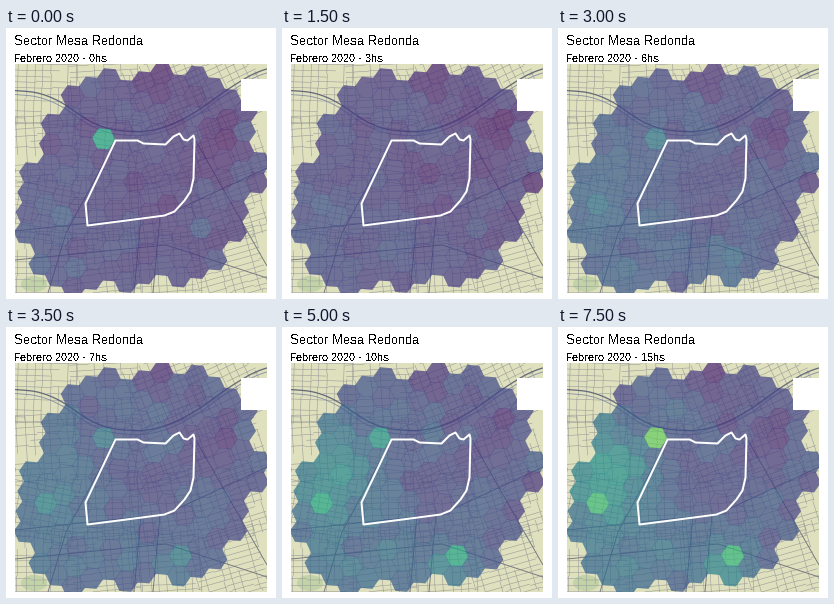
Recreate the animation shown at these times as a matplotlib script. Size 270 by 271 pixels, loop 8 s.

```python
import numpy as np
import matplotlib.pyplot as plt
from matplotlib.animation import FuncAnimation
from matplotlib.collections import LineCollection, PolyCollection
from matplotlib.patches import Ellipse, Rectangle

W, H, DPI = 270, 271, 100
PX = 72 / DPI
HOURS = 16
X0, Y0, X1, Y1 = 9, 36, 261, 265

plt.rcParams.update({"text.hinting": "native", "text.hinting_factor": 1})
fig = plt.figure(figsize=(W / DPI, H / DPI), dpi=DPI, facecolor="white")
ax = fig.add_axes([0, 0, 1, 1])
ax.set_xlim(0, W)
ax.set_ylim(H, 0)
ax.axis("off")

panel = Rectangle((X0, Y0), X1 - X0, Y1 - Y0, fc="#dfe0bd", ec="none", zorder=0)
ax.add_patch(panel)
park = Ellipse((28, 256), 26, 16, fc="#c3d3a8", ec="none", zorder=0.5)
ax.add_patch(park)
park.set_clip_path(panel)
rng = np.random.default_rng(12)


def add(collection):
    ax.add_collection(collection)
    collection.set_clip_path(panel)
    return collection


def directions(deg):
    a = np.radians(deg)
    return np.stack([np.cos(a), np.sin(a)], -1)


# --- base map: blocks of broken, tilted streets ---
def street_grid(center, size, angle, gap):
    u, v = directions(np.array([angle, angle + 90]))
    segs = []
    for along, across, step in ((u, v, gap), (v, u, gap * 1.4)):
        for off in np.arange(-size / 2, size / 2, step):
            s = -size / 2
            while s < size / 2:
                e = s + rng.uniform(14, 45)
                if rng.random() < 0.8:
                    base = center + across * (off + rng.uniform(-1, 1))
                    segs.append([base + along * s, base + along * min(e, size / 2)])
                s = e
    return segs


streets = []
for cx in range(X0 + 28, X1, 62):
    for cy in range(Y0 + 28, Y1, 58):
        tilt = -8 - 0.16 * (cx - 135) + rng.uniform(-12, 12)
        streets += street_grid(np.array([cx, cy]), 68, tilt, 6)
add(LineCollection(streets, colors="#999b98", linewidths=0.55 * PX, zorder=1))

avenues = [[(9, 203), (160, 187), (261, 140)], [(187, 108), (261, 238)],
           [(110, 112), (60, 205), (42, 265)], [(9, 232), (160, 217), (261, 250)]]
avenues += [[(x, 188), (x - 7, Y1)] for x in (135, 154)]
add(LineCollection(avenues, colors="#72757c", linewidths=0.9 * PX, zorder=1))

# river bend with its two banks
rx = np.linspace(X0, X1, 80)
ry = np.interp(rx, [9, 44, 94, 144, 184, 224, 261], [62, 66, 101, 105, 89, 59, 38])
ry = np.convolve(np.pad(ry, 6, mode="edge"), np.ones(13) / 13, "valid")
add(LineCollection([np.c_[rx, ry + d] for d in (0, 4)], colors=["#666b7a", "#8b93a3"],
                   linewidths=[1.3 * PX, 0.9 * PX], zorder=1))

# --- sector outline ---
SECTOR = np.array([(109, 112), (131, 112), (137, 115), (159, 116), (167, 108),
                   (173, 105), (177, 111), (181, 112), (187, 107), (188, 111),
                   (187, 150), (184, 163), (178, 172), (168, 183), (158, 187),
                   (120, 192), (81, 197), (79, 175)]) + 0.5
outline = plt.Polygon(SECTOR, fill=False, ec="white", lw=2 * PX,
                      joinstyle="round", zorder=3)
ax.add_patch(outline)

# --- tilted hexagon lattice, kept within REACH of the sector ---
STEP, TILT, REACH = 20.1, 5, 65
basis = STEP * directions(np.array([30 + TILT, 90 + TILT]))
grid = np.stack(np.meshgrid(np.arange(-8, 14), np.arange(-14, 16)), -1).reshape(-1, 2)
centers = np.array([97.7, 111]) + grid @ basis

a, b = SECTOR, np.roll(SECTOR, -1, axis=0)
along = ((centers[:, None] - a) * (b - a)).sum(2) / ((b - a) ** 2).sum(1)
nearest = a + np.clip(along, 0, 1)[..., None] * (b - a)
gap = np.linalg.norm(centers[:, None] - nearest, axis=2).min(1)
centers = centers[(gap < REACH) | outline.get_path().contains_points(centers)]

corners = 1.02 * STEP / np.sqrt(3) * directions(TILT + 60 * np.arange(6))
hexes = add(PolyCollection(centers[:, None] + corners, linewidths=0, zorder=2))
cmap = plt.get_cmap("viridis")


# --- activity per cell and hour ---
def blob(x, y, sx, sy):
    return np.exp(-(((centers - (x, y)) / (sx, sy)) ** 2).sum(1) / 2)


def ease(t, start, end):
    u = np.clip((t - start) / (end - start), 0, 1)
    return u * u * (3 - 2 * u)


def spot(x, y):
    return blob(x, y, 5, 5)


west = blob(48, 145, 32, 34)
south = blob(169, 238, 17, 17) + 0.45 * blob(85, 235, 55, 30)
cold = blob(212, 105, 22, 28) + blob(152, 52, 18, 14) + 0.5 * blob(140, 150, 26, 20)
corner, market, depot = spot(97, 111), spot(39, 177), spot(174, 229)
fixed = rng.normal(0, 1, len(centers))
wobble = rng.normal(0, 1, (HOURS, len(centers)))


def levels(hour):
    day = ease(hour, 3, 13)
    v = 0.17 + 0.05 * ease(hour, 3, 7) + 0.03 * blob(50, 200, 60, 70)
    v = v + 0.018 * fixed + 0.015 * wobble[hour] - 0.08 * cold
    v += day * (0.28 * west + 0.2 * south)
    v += corner * (0.4 * np.exp(-hour) + 0.15 * ease(hour, 4, 6) + 0.34 * ease(hour, 8, 14))
    v += day * (0.2 * market + 0.26 * depot)
    return np.clip(v, 0.04, 0.9)


# --- labels and cover ---
def label(y, size, text=""):
    return ax.text(8, y, text, family="Liberation Sans", fontsize=size * PX,
                   color="black", va="baseline", antialiased=False)


ax.add_patch(Rectangle((235, 51), 27, 32, fc="white", ec="none", zorder=4))
label(17, 13, "Sector Mesa Redonda")
subtitle = label(34, 11)


def draw(hour):
    hexes.set_facecolor(cmap(levels(hour), alpha=0.7))
    subtitle.set_text(f"Febrero 2020 - {hour}hs")
    return hexes, subtitle


anim = FuncAnimation(fig, draw, frames=HOURS, interval=500, repeat=True, repeat_delay=0)
plt.show()
```
